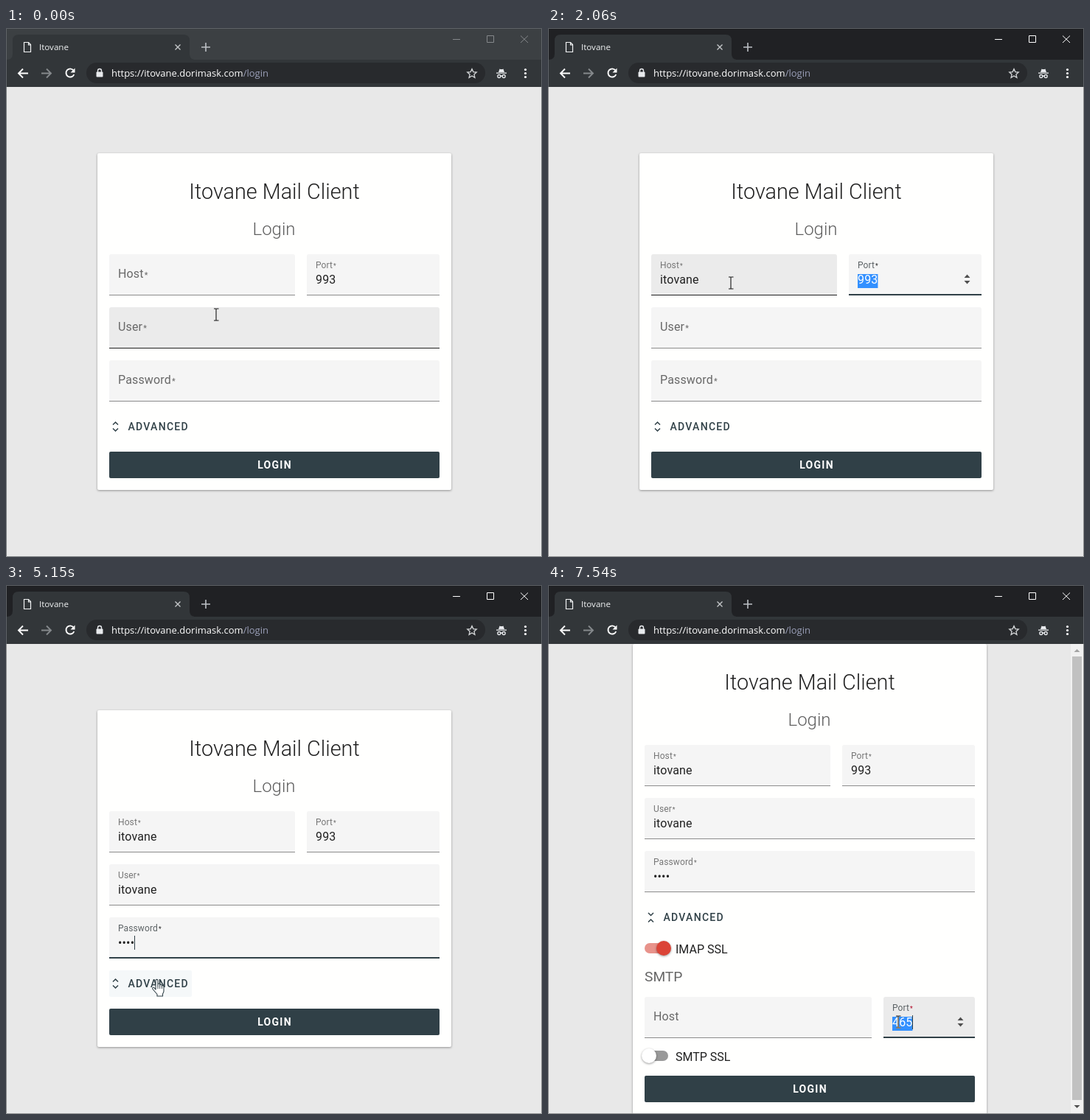
Animation, 727 px wide and 718 px high, one loop 8 s. Source, as an HTML page:

```html
<!DOCTYPE html>
<html lang="en">
<head>
<meta charset="utf-8">
<title>Mail client login</title>
<style>
  html, body { margin: 0; width: 100%; height: 100%; overflow: hidden; background: #e8e8e8; }
  svg { display: block; width: 727px; height: 718px; isolation: isolate; }
  text { font-family: Roboto, sans-serif; font-size: 16px; white-space: pre; }
  .ui { font-family: "Open Sans", "Noto Sans", sans-serif; }
  .field { letter-spacing: .15px; }
  .small { font-size: 12px; letter-spacing: .11px; }
  .button { font-size: 14px; letter-spacing: 1.25px; }
  .card { filter: drop-shadow(0 1px 1.5px rgba(0, 0, 0, .38)); }
  .thumb { filter: drop-shadow(0 1px 1.5px rgba(0, 0, 0, .4)); }
  .beam { mix-blend-mode: difference; }
</style>
</head>
<body>
<svg id="stage" viewBox="0 0 727 718"></svg>
<script>
const stage = document.getElementById('stage');
const NAME = 'itovane', TITLE = 'Itovane', DOMAIN = 'dorimask';
const DARK = '#304047', DURATION = 8000;

const FIELDS = {
  host: { x: 140, y: 307, w: 252, label: 'Host', required: true },
  port: { x: 408, y: 307, w: 180, label: 'Port', required: true, number: true },
  user: { x: 140, y: 379, w: 448, label: 'User', required: true },
  pass: { x: 140, y: 451, w: 448, label: 'Password', required: true },
  smtpHost: { x: 140, y: 649, w: 308, label: 'Host', advanced: true },
  smtpPort: { x: 464, y: 649, w: 124, label: 'Port', required: true, number: true, advanced: true }
};

// Each step keeps whatever the previous one set.
const STEPS = [
  { at: 0, active: false, port: '993', smtpPort: '465', hover: 'user', ssl: true, cursor: ['beam', 285, 389] },
  { at: 330, active: true, hover: 'host', focus: 'host', caret: true, line: [151, 345], tip: true, cursor: ['beam', 248, 346] },
  { at: 680, host: NAME.slice(0, 1), line: null, tip: false, red: true },
  { at: 1030, host: NAME.slice(0, 4) },
  { at: 1380, host: NAME },
  { at: 1710, focus: 'port', selected: true, caret: false, line: [409, 587], red: false },
  { at: 2060, line: null },
  { at: 2390, focus: 'user', selected: false, caret: true },
  { at: 2740, user: NAME.slice(0, 3) },
  { at: 3090, user: NAME },
  { at: 3420, focus: 'pass' },
  { at: 3770, caret: false },
  { at: 4120, caret: true, pass: '•' },
  { at: 4450, pass: '••••' },
  { at: 4800, caret: false, hover: '', cursor: ['beam', 220, 480] },
  { at: 5150, caret: true, hover: 'advanced', cursor: ['hand', 198, 535] },
  { at: 5500, advanced: true, focus: '', hover: '', cursor: ['arrow', 203, 535] },
  { at: 5830, hover: 'smtpHost', cursor: ['beam', 188, 587] },
  { at: 6180, hover: '', cursor: ['hand', 150, 631] },
  { at: 6530, ssl: false },
  { at: 6860, hover: 'smtpHost', cursor: ['beam', 300, 609] },
  { at: 7210, hover: 'smtpPort', cursor: ['beam', 500, 579] },
  { at: 7540, focus: 'smtpPort', selected: true, red: true, cursor: ['beam', 475, 593] }
];
const states = [];
STEPS.forEach((step, i) => states.push({ ...states[i - 1], ...step }));

const pen = document.createElement('canvas').getContext('2d');
function textWidth(text) {
  pen.font = '16px Roboto, sans-serif';
  return pen.measureText(text).width + text.length * .15;
}

const rect = (x, y, w, h, fill, more = '') =>
  `<rect x="${x}" y="${y}" width="${w}" height="${h}" fill="${fill}" ${more}/>`;
const text = (x, y, content, fill, more = '') =>
  `<text x="${x}" y="${y}" fill="${fill}" ${more}>${content}</text>`;
const line = (d, color, width = 1, more = '') =>
  `<path d="${d}" fill="none" stroke="${color}" stroke-width="${width}" ${more}/>`;
const shape = (d, fill, more = '') => `<path d="${d}" fill="${fill}" ${more}/>`;

function field(id, s) {
  const { x, y, w, label, required, number } = FIELDS[id];
  const value = s[id] || '', focused = s.focus === id, hovered = s.hover === id;
  const floating = focused || value;
  const left = x + 12, base = y + 40;
  const starColor = focused ? (s.red ? '#b00020' : '#222') : '#666';
  const star = required
    ? `<tspan dx="1" font-size="${floating ? 8.5 : 11}" fill="${starColor}">*</tspan>` : '';
  let out = shape(`M${x} ${y + 56}v-53q0-3 3-3h${w - 6}q3 0 3 3v53z`, hovered ? '#ebebeb' : '#f5f5f5');
  out += floating
    ? text(left, y + 19, label + star, focused ? '#5c6265' : '#767676', 'class="small"')
    : text(left, y + 32, label + star, '#686868', 'class="field"');
  out += rect(x, y + 55, w, 1, hovered ? '#212121' : '#8c8c8c');
  if (focused) {
    const [from, to] = s.line || [x, x + w];
    out += rect(from, y + 54, to - from, 2, DARK);
  }
  const selected = focused && s.selected, width = textWidth(value);
  if (selected) out += rect(left, y + 277 - 250, width, 19, '#3390ff');
  out += text(left, base, value, selected ? '#fff' : '#212121', 'class="field"');
  if (focused && s.caret) out += rect(Math.round(left + width), y + 25, 1, 19, DARK);
  if (number && (focused || hovered)) {
    const cx = x + w - 19.5, cy = y + 34;
    out += shape(`M${cx - 4} ${cy - 2}l4-4.5 4 4.5zM${cx - 4} ${cy + 2}l4 4.5 4-4.5z`, '#505050');
  }
  return out;
}

function toggle(y, on, label) {
  return rect(140, y - 7, 32, 14, on ? '#e8938b' : '#999', 'rx="7"') +
    `<circle class="thumb" cx="${on ? 166 : 146}" cy="${y}" r="10" fill="${on ? '#db4437' : '#fff'}"/>` +
    text(182, y + 7, label, '#212121');
}

function advancedButton(s) {
  const chevrons = s.advanced
    ? 'M145 535l3.5 3.5 3.5-3.5M145 547.500l3.500-3.500 3.500 3.500'
    : 'M145 538.500l3.500-3.500 3.500 3.500M145 543.500l3.500 3.500 3.500-3.500';
  return (s.hover === 'advanced' ? rect(140, 523, 112, 36, '#f5f8f9', 'rx="2"') : '') +
    line(chevrons, DARK, 1.5) +
    text(165.500, 546, 'ADVANCED', DARK, 'class="button" font-weight="500"');
}

function page(s) {
  const buttonY = s.advanced ? 756 : 575;
  let out = rect(124, 170, 480, buttonY + 52 - 170, '#fffffe', 'rx="2" class="card"');
  out += text(364, 232, `${TITLE} Mail Client`, '#212121', 'text-anchor="middle" font-weight="300" style="font-size:28.8px"');
  out += text(363.500, 281, 'Login', '#5f5f5f', 'text-anchor="middle" font-weight="300" style="font-size:24px"');
  for (const id in FIELDS) if (s.advanced || !FIELDS[id].advanced) out += field(id, s);
  out += advancedButton(s);
  if (s.advanced) {
    out += toggle(583, true, 'IMAP SSL') + toggle(729, s.ssl, 'SMTP SSL');
    out += text(140, 628, 'SMTP', '#666', 'style="font-size:19.2px"');
  }
  out += rect(140, buttonY, 448, 36, DARK, 'rx="2"');
  out += text(364.500, buttonY + 23, 'LOGIN', '#fff', 'text-anchor="middle" class="button" font-weight="700"');
  return `<g transform="translate(${s.advanced ? '-9 -90' : '0 0'})">${out}</g>`;
}

const scrollbar = () =>
  rect(709, 80, 17, 637, '#f1f1f1') + rect(711, 97, 13, 602, '#c1c1c1') +
  shape('M713.500 91l4-4 4 4z', '#a3a3a3') + shape('M713.500 706l4 4 4-4z', '#505050');

function browser(s) {
  const control = s.active ? '#fff' : '#85888b';
  let out = rect(0, 0, 727, 44, s.active ? '#202124' : '#3c4043');
  out += shape('M1 43q8 0 8-8v-18q0-8 8-8h224q8 0 8 8v18q0 8 8 8z', '#323639') + rect(0, 43, 727, 37, '#323639');
  out += line('M24.500 19.500h6l3 3v10h-9zM30.500 19.500v3.500h3.500', '#f1f3f4', 1.2);
  out += text(45, 30, TITLE, '#f1f3f4', 'class="ui" style="font-size:11.6px"');
  out += line('M229.500 22.500l7 7m0-7l-7 7', '#c4c7c9', 1.4) + line('M265 26h12m-6-6v12', '#bdc1c6', 1.6);
  out += line('M606 15.500h10M652.500 10.500h9v9h-9zM698 10.500l10 9.500m0-9.500l-10 9.500', control, 1);
  out += line('M30 61.500H17.500M23 55.500l-6 6 6 6', '#fff', 1.9);
  out += line('M48 61.500h12.500M55 55.500l6 6-6 6', '#85898c', 1.9);
  out += line('M91.500 57.500a5.600 5.600 0 1 0 .8 5.500', '#fff', 1.9) + shape('M93.500 54.500v6h-6z', '#fff');
  out += rect(109, 47, 541, 28, '#282a2d', 'rx="14"');
  out += rect(122.500, 59.500, 9, 7, '#e8eaed', 'rx="1"') + line('M124.500 60v-2a2.500 2.500 0 0 1 5 0v2', '#e8eaed', 1.4);
  out += text(143, 66, `https://${NAME}.${DOMAIN}.com<tspan fill="#9a9fb8">/login</tspan>`, '#fff', 'class="ui" style="font-size:13px"');
  out += line('M632 55.500l1.800 4.100 4.400.4-3.300 2.900 1 4.400-3.900-2.300-3.900 2.300 1-4.400-3.300-2.900 4.400-.4z', '#d5d7d9', 1.3);
  out += shape('M668 60l1.500-4.500q2.500 1 5 0l1.500 4.500z', '#e8eaed') + rect(665, 60.500, 14, 1.300, '#e8eaed');
  out += line('M670.800 65.500a2 2 0 1 1-4 0a2 2 0 1 1 4 0q1.200-1 2.400 0a2 2 0 1 0 4 0a2 2 0 1 0-4 0', '#e8eaed', 1.3);
  for (const y of [56.500, 61.500, 66.500]) out += `<circle cx="704.500" cy="${y}" r="1.600" fill="#fff"/>`;
  return out;
}

const tooltip = () =>
  rect(249, 358, 134, 20, '#000', 'opacity=".35"') +
  rect(246.500, 355.500, 133, 19, '#fff', 'stroke="#767676"') +
  text(252, 369, 'Please fill out this field.', '#575757', 'class="ui" style="font-size:11.4px"');

const CURSORS = {
  beam: line('M-3 -8h2.500q.5 0 .5.500v15q0 .5-.5.500h-2.500M3.500 -8h-2.500q-.5 0-.5.500M3.500 8h-2.500q-.5 0-.5-.5', '#fff', 1.1, 'class="beam"'),
  arrow: shape('M.5 .5v16l3.700-3.500 2.500 5.700 2.500-1.100-2.500-5.500h5z', '#fff', 'stroke="#111" stroke-linejoin="round"'),
  hand: shape('M5 14V2q0-1.600 1.500-1.600T8 2v7V7q0-1 1.300-1t1.400 1.200V9V8q.2-1 1.400-.9t1.300 1.200V10V9.300q.2-.9 1.300-.8T16 10v6q0 2-1.500 4v3H7v-2.500L1 13.500q-.8-1.700.6-2.200T4 13z',
    '#fff', `stroke="${DARK}" stroke-width="1.100" stroke-linejoin="round"`) + line('M8 9v4M10.700 9v4M13.400 10v3', DARK, .9)
};

function draw(s) {
  const [kind, x, y] = s.cursor;
  const edge = s.active ? '#8b8d8e' : '#777b7d';
  stage.innerHTML = rect(0, 0, 727, 718, '#e8e8e8') + page(s) + (s.advanced ? scrollbar() : '') +
    browser(s) + line('M.5 80V717.500H726.500V80', edge) + line('M.5 80V.5H726.500V80', '#5f6368') +
    (s.tip ? tooltip() : '') + `<g class="${kind}" transform="translate(${x} ${y})">${CURSORS[kind]}</g>`;
}

let shown = null;
function tick(now) {
  const time = now % DURATION;
  const state = states.findLast(s => s.at <= time) || states[0];
  if (state !== shown) draw(shown = state);
  requestAnimationFrame(tick);
}
draw(shown = states[0]);
requestAnimationFrame(tick);
</script>
</body>
</html>
```
